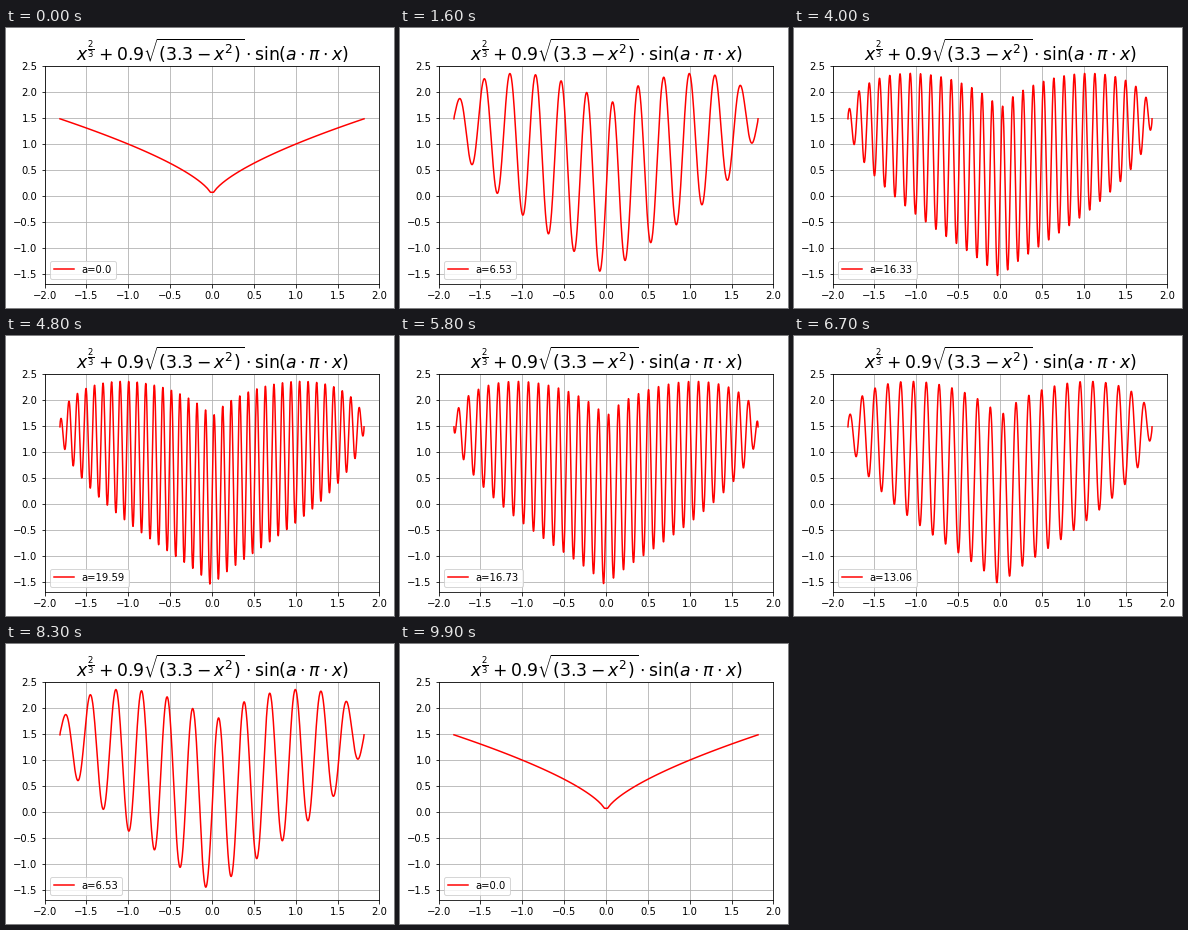
A matplotlib script for the animation above (10000 ms loop, 388 px wide and 280 px high).

```python
import numpy as np
import matplotlib.pyplot as plt
from matplotlib.animation import FuncAnimation

W, H, DPI = 388, 280, 72
HALF = 50                     # frames in each direction
EDGE = np.sqrt(3.3)

plt.rcParams["font.family"] = "DejaVu Sans"
plt.rcParams["font.size"] = 10

ramp = np.linspace(0, 20, HALF)
steps = np.concatenate([ramp, ramp[::-1]])


def curve(a):
    # denser sampling for faster waves
    x = np.linspace(-EDGE, EDGE, 100 + 2 * int(50 * a))
    root = np.sqrt(np.maximum(3.3 - x**2, 0))
    return x, np.cbrt(x**2) + 0.9 * root * np.sin(a * np.pi * x)


fig = plt.figure(figsize=(W / DPI, H / DPI), dpi=DPI, facecolor="white")
ax = fig.add_axes([38.6 / W, 24.1 / H, 334.8 / W, 217.44 / H])
ax.set_xlim(-2, 2)
ax.set_ylim(-1.7, 2.5)
ax.set_xticks(np.arange(-2, 2.1, 0.5))
ax.set_yticks(np.arange(-1.5, 2.6, 0.5))
ax.grid(True)
ax.set_title(
    r"$x^{\frac{2}{3}} + 0.9\sqrt{(3.3 - x^2)} \cdot \sin(a \cdot \pi \cdot x)$",
    fontsize="xx-large", y=1.0, pad=6)
line, = ax.plot([], [], color="red", lw=1.5, label="a=0.0")
legend = ax.legend(loc="lower left")


def draw(i):
    a = steps[i]
    line.set_data(*curve(a))
    legend.get_texts()[0].set_text(f"a={float(round(a, 2))}")
    return line, legend


def reset():
    return draw(0)


anim = FuncAnimation(fig, draw, frames=len(steps), init_func=reset,
                     interval=100, repeat=True, repeat_delay=0, blit=False)
plt.show()
```
